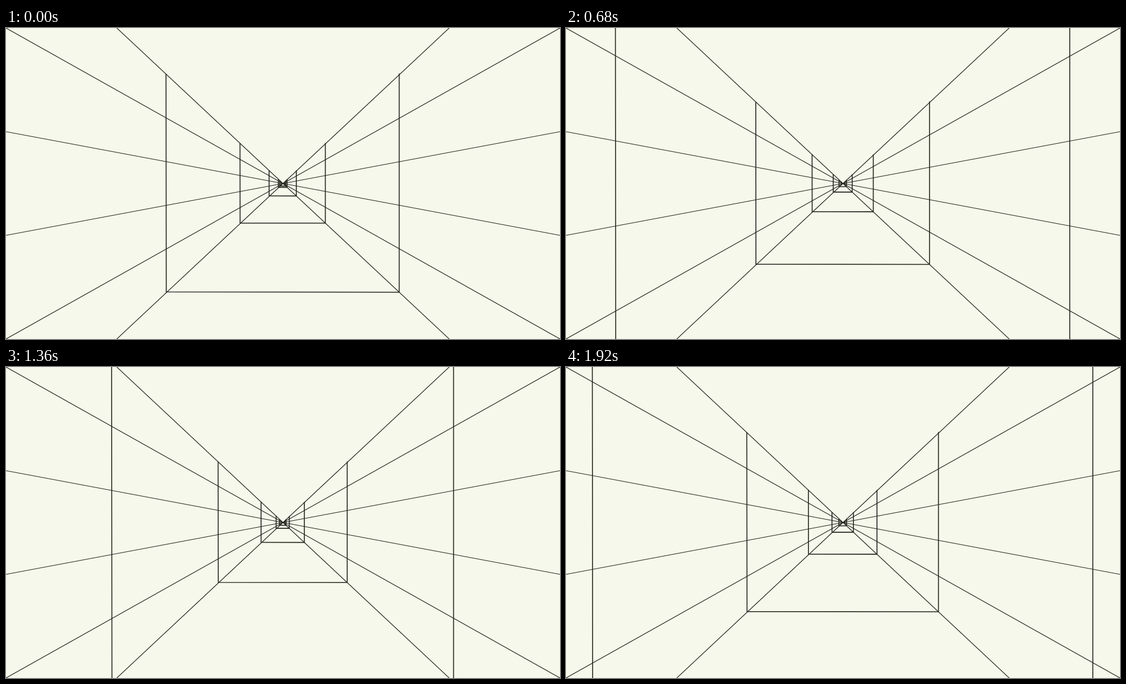
Recreate the animation shown at these times as an HTML page with a canvas. Size 960 by 540 pixels, loop 1.96 s.

```html
<!DOCTYPE html>
<html lang="en">
<head>
<meta charset="utf-8">
<title>Corridor</title>
<style>
  html, body { margin: 0; width: 100%; height: 100%; overflow: hidden; background: #f6f8eb; }
  canvas { display: block; width: 960px; height: 540px; }
</style>
</head>
<body>
<canvas id="stage" width="960" height="540"></canvas>
<script>
const ctx = document.getElementById('stage').getContext('2d');
const W = 960, H = 540, CX = W / 2, CY = H / 2;
const STEP = 40, FRAMES = 49, PERIOD = 400, GATES = 5;
const FLOOR = 288;         // half width of the floor at the stage edge
const RISE = CY / FLOOR;   // wall height per half width

// Half width of a gate at the start of each period, with one extra key at both ends
const keys = [5.2, 5.2, 7.6, 23.6, 73.9, 201.9, 529, 1556].map(Math.log);

// Smooth growth through the logarithms of the keys, u running from 0 to 1
function gateSize(i, u) {
  const [a, b, c, d] = keys.slice(i, i + 4);
  const v = 1 - u;
  return Math.exp(
    v * v * (1 + 2 * u) * b + u * u * (1 + 2 * v) * c +
    u * v * (v * (c - a) - u * (d - b)) / 2);
}

function drawRays() {
  ctx.lineWidth = 1.15;
  ctx.beginPath();
  for (const side of [-1, 1]) {
    for (let i = 0; i < 6; i++) {
      const corner = i > 3;
      const x = corner ? FLOOR : CX;
      const y = corner ? (i - 4) * H : i * H / 3;
      ctx.moveTo(CX, CY);
      ctx.lineTo(CX + side * x, y);
    }
  }
  ctx.stroke();
}

// Two walls and a floor, slightly out of true
function drawGate(r) {
  const x = CX - 0.5, y = CY - 0.5;
  ctx.lineWidth = 1.6;
  ctx.beginPath();
  ctx.moveTo(x - r * 1.0015, y - r * 0.941);
  ctx.lineTo(x - r * 0.9995, y + r * 0.935);
  ctx.lineTo(x + r, y + r * RISE);
  ctx.lineTo(x + r, y - r * 0.944);
  ctx.stroke();
}

function draw(time) {
  const t = Math.floor(time / STEP) % FRAMES * STEP;
  const phase = t % PERIOD / PERIOD;
  ctx.fillStyle = '#f6f8eb';
  ctx.fillRect(0, 0, W, H);
  ctx.strokeStyle = '#25261e';
  drawRays();
  for (let i = 0; i < GATES; i++) drawGate(gateSize(i, phase));
}

const start = performance.now();
function tick() {
  draw(performance.now() - start);
  requestAnimationFrame(tick);
}
tick();
</script>
</body>
</html>
```
